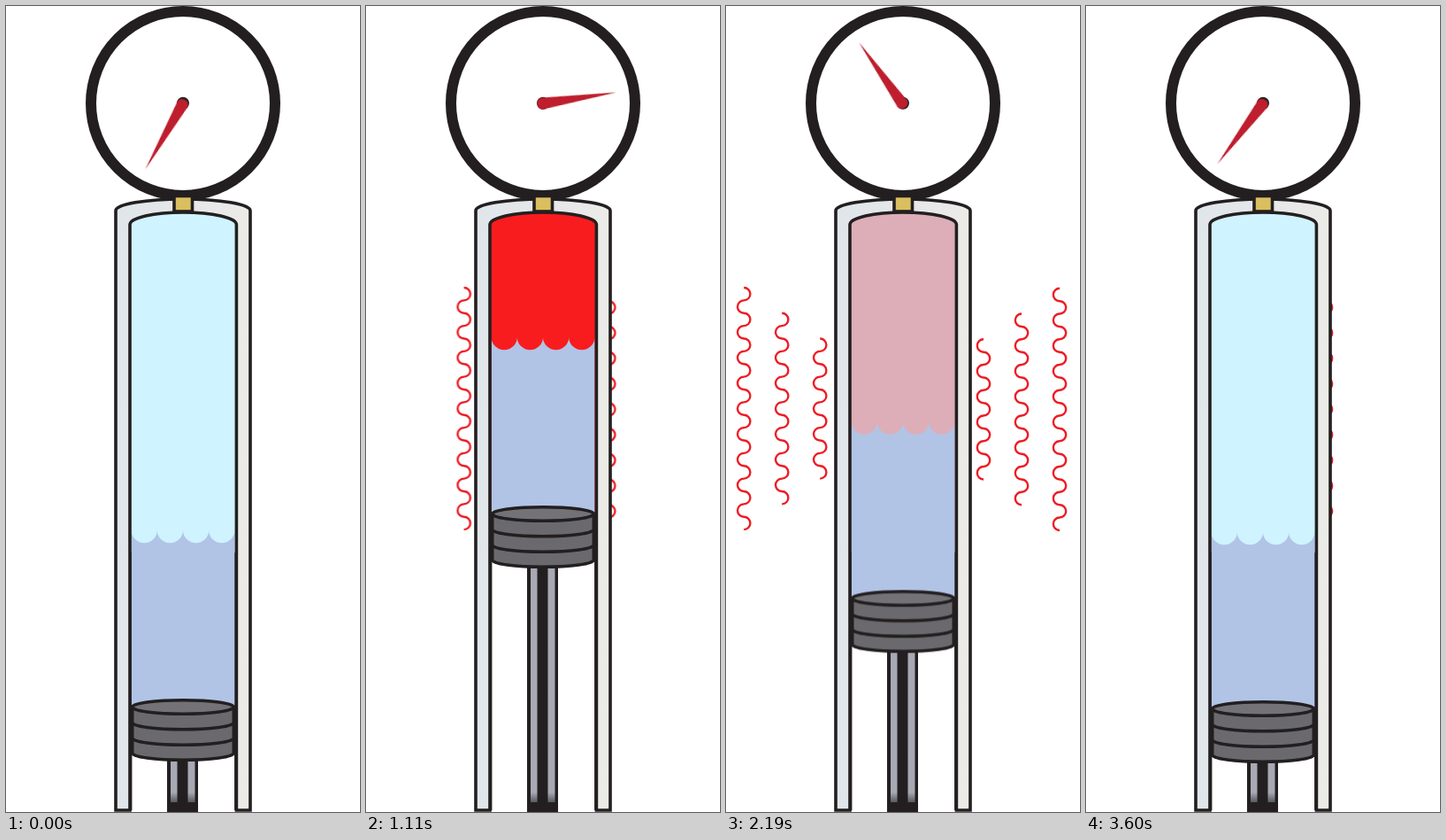
Recreate the animation shown at these times as an HTML page. Size 400x910 px, loop 4.6 s.

```html
<!DOCTYPE html>
<html lang="en">
<head>
<meta charset="utf-8">
<title>Piston, gas and gauge</title>
<style>
  html, body { margin: 0; width: 100%; height: 100%; overflow: hidden; background: #fff; }
  svg { display: block; width: 100%; height: 100%; }

  .line { stroke: #231f20; stroke-width: 3.6; }
  .wave { fill: none; stroke: #ed1c24; stroke-width: 2.4; }

  /* 900 ms per stage, drawn every 30 ms, then a one second rest */
  #piston, #gas, #needle, #left, #right {
    animation: 4600ms steps(30) infinite;
  }
  #piston { animation-name: press; }
  #gas    { animation-name: heat; }
  #needle { animation-name: swing; }
  #left   { animation-name: flow-left; }
  #right  { animation-name: flow-right; }

  @keyframes press {
    0% { transform: translateY(0); }
    19.5652%, 39.1304% { transform: translateY(-218px); }
    58.6956%, 100% { transform: translateY(2px); }
  }
  @keyframes heat {
    0% { fill: #cff3ff; }
    19.5652% { fill: #f00; animation-timing-function: steps(60); }
    58.6956%, 100% { fill: #cff3ff; }
  }
  @keyframes swing {
    0% { transform: translate(-2px, 3.5px) rotate(209.8deg); animation-timing-function: steps(15); }
    9.7826% { transform: translate(1.7px, 1.1px) rotate(482.5deg); animation-timing-function: steps(15); }
    19.5652% { transform: translate(2px, -.2px) rotate(444deg); }
    39.1304% { transform: translate(1.9px, -.6px) rotate(433deg); animation-timing-function: steps(15); }
    48.913% { transform: translate(-3.2px, -2.5px) rotate(308deg); animation-timing-function: steps(15); }
    58.6956%, 100% { transform: translate(-2.4px, 3.2px) rotate(217deg); }
  }
  @keyframes flow-left {
    0%, 19.5652% { transform: translateX(118px); }
    39.1304%, 58.6956% { transform: translateX(0); }
    78.2608%, 100% { transform: translateX(120px); }
  }
  @keyframes flow-right {
    0%, 19.5652% { transform: translateX(-134px); }
    39.1304%, 58.6956% { transform: translateX(0); }
    78.2608%, 100% { transform: translateX(-106px); }
  }
</style>
</head>
<body>
<svg viewBox="0 0 400 910" preserveAspectRatio="none">
  <defs>
    <linearGradient id="steel" gradientUnits="userSpaceOnUse" x1="0" y1="620" x2="0" y2="899">
      <stop offset="0" stop-color="#a7a9b4"/>
      <stop offset=".96" stop-color="#a7a9b4"/>
      <stop offset="1" stop-color="#58595b"/>
    </linearGradient>
    <linearGradient id="shell">
      <stop offset="0" stop-color="#dfe6ea"/>
      <stop offset=".5" stop-color="#e6e7ea"/>
      <stop offset="1" stop-color="#ebebe6"/>
    </linearGradient>
  </defs>

  <g id="left" class="wave"></g>
  <g id="right" class="wave"></g>

  <!-- inside of the cylinder -->
  <path fill="#fff" d="M140 910V247A60 14 0 0 1 260 247V910Z"/>
  <path fill="#231f20" d="M182 620H217V910H182Z"/>
  <path fill="url(#steel)" d="M186 620H193.5V899H186ZM205.5 620H213.5V899H205.5Z"/>
  <path id="gas" fill="#cff3ff" d="M140 617V247A60 14 0 0 1 260.5 247V617Z"/>
  <path fill="none" stroke="#231f20" stroke-width="1.6" d="M141.6 617V908M258.9 617V908"/>

  <g id="piston">
    <path fill="#b1c4e6" d="M141.6 592a14.6 14.3 0 0 0 29.2 0a14.6 14.3 0 0 0 29.2 0a14.6 14.3 0 0 0 29.2 0a14.6 14.3 0 0 0 29.2 0V792H141.6Z"/>
    <g class="line">
      <path fill="#6a696d" d="M142.7 791.5V843.5A57.3 7.75 0 0 0 257.3 843.5V791.5Z"/>
      <path fill="none" d="M142.7 809A57.3 7.75 0 0 0 257.3 809M142.7 826.5A57.3 7.75 0 0 0 257.3 826.5"/>
      <ellipse fill="#727277" cx="200" cy="791.5" rx="57.3" ry="7.75"/>
    </g>
  </g>

  <path class="line" fill="url(#shell)" d="M124 908V231A76 13 0 0 1 276 231V908H260.4V247A60.2 14 0 0 0 140 247V908Z"/>

  <!-- gauge -->
  <circle cx="200" cy="110" r="104" fill="#fff" stroke="#231f20" stroke-width="12"/>
  <rect class="line" x="190" y="214.5" width="20.5" height="17.5" fill="#d9bf5f"/>
  <g transform="translate(200 110)">
    <circle cy="-.3" r="7" fill="#231f20"/>
    <path id="needle" fill="#be1e2d" d="M0-82L6.6 3A6.6 5.6 0 0 1-6.6 3Z"/>
  </g>
</svg>

<script>
  const BUMP = 14.375;

  // A column of half circles that bulge to alternate sides.
  function wave(x, y, bumps, side) {
    const r = BUMP / 2;
    let d = `M${x} ${y}`;
    for (let i = 0; i < bumps; i++) {
      const sweep = (i % 2 === 0) === (side > 0) ? 1 : 0;
      d += `a${r} ${r} 0 0 ${sweep} 0 ${BUMP}`;
    }
    const path = document.createElementNS('http://www.w3.org/2000/svg', 'path');
    path.setAttribute('d', d);
    return path;
  }

  function addWaves(id, x, y, side) {
    const group = document.getElementById(id);
    for (let i = 0; i < 3; i++) {
      group.append(wave(x + side * 43 * i, y + 2 * BUMP * i, 19 - 4 * i, side));
    }
  }

  addWaves('left', 20.2, 318, 1);
  addWaves('right', 377, 318.8, -1);
</script>
</body>
</html>
```
